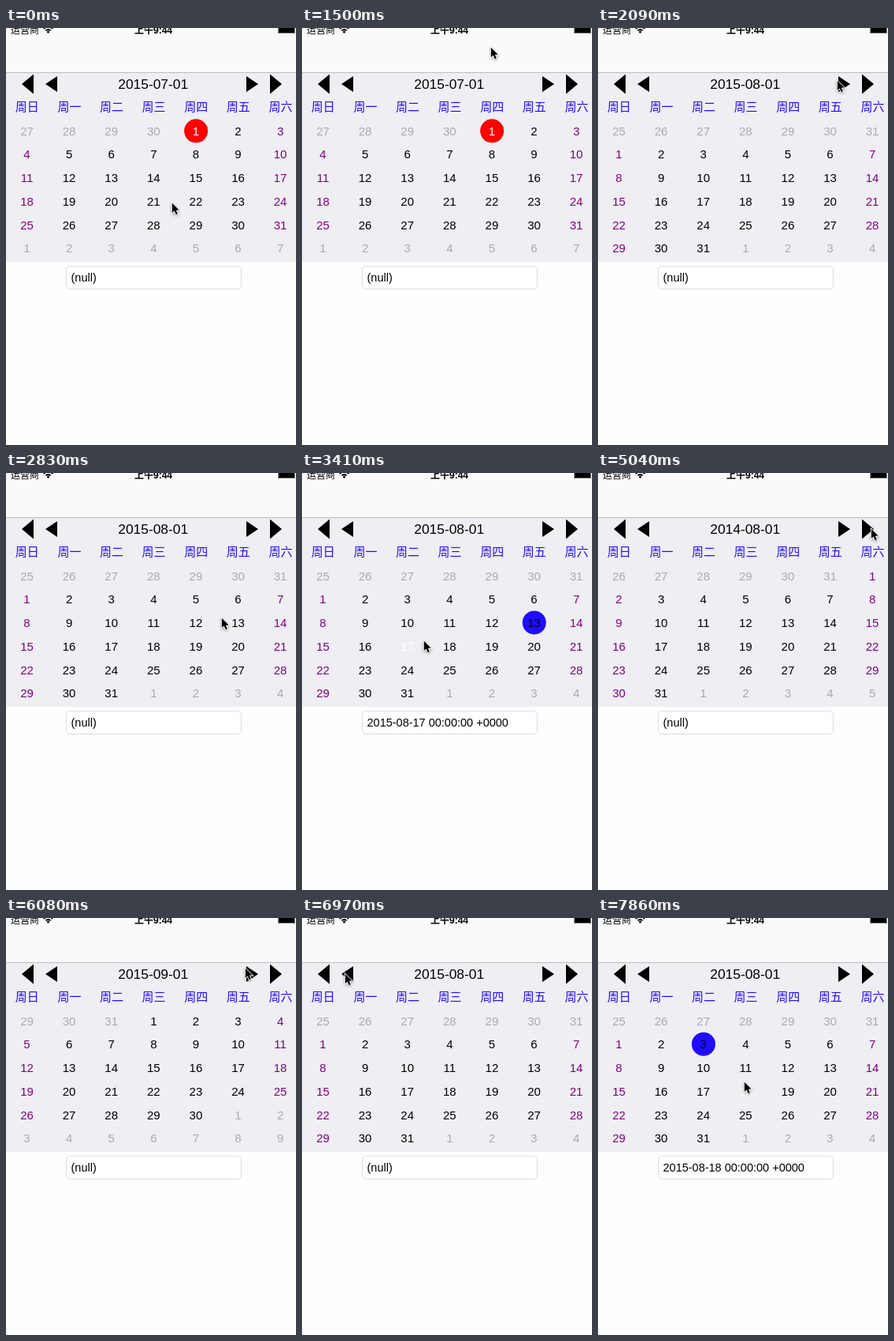
An HTML page with a canvas that plays this animation: 368 px wide and 528 px high, repeating every 8 s.

```html
<!DOCTYPE html>
<html lang="zh">
<head>
<meta charset="utf-8">
<title>Calendar</title>
<style>
  html, body { margin: 0; width: 100%; height: 100%; overflow: hidden; background: #fefefe; }
  canvas { display: block; width: 368px; height: 528px; }
</style>
</head>
<body>
<canvas id="stage"></canvas>
<script>
const W = 368, H = 528, LOOP = 8000, START = 892, TICK = 148;
const SANS = '"Liberation Sans", Arial, sans-serif';
const HAN = '"Noto Sans CJK SC", "Noto Sans CJK", sans-serif';
const BLUE = '#200dff';

const canvas = document.getElementById('stage');
const ctx = canvas.getContext('2d');
const ratio = window.devicePixelRatio || 1;
canvas.width = W * ratio;
canvas.height = H * ratio;

// The session is acted out once, one snapshot per tick.
const film = [];
const now = { x: 210, y: 221, year: 2015, month: 7, selected: 0, ringed: 0 };

function hold(ticks) {
  for (let i = 0; i < ticks; i++) {
    now.ringed = now.selected; // the ring follows one tick late
    film.push({ ...now });
  }
}

function go(x, y, ticks) {
  const dx = (x - now.x) / ticks, dy = (y - now.y) / ticks;
  for (let i = 0; i < ticks; i++) {
    now.x += dx;
    now.y += dy;
    hold(1);
  }
}

// Clicks take effect in the latest snapshot.
function click(change) {
  Object.assign(now, change);
  film[film.length - 1] = { ...now };
}

const pick = day => click({ selected: day });

function turn(months) {
  const date = new Date(Date.UTC(now.year, now.month - 1 + months, 1));
  click({ year: date.getUTCFullYear(), month: date.getUTCMonth() + 1, selected: 0, ringed: 0 });
}

hold(1);
go(239, 24, 5);
go(303, 66, 3);
hold(1);
turn(1);
go(313, 67, 1);
hold(1);
go(273, 183, 3);
go(286, 186, 1);
pick(13);
go(154, 212, 3);
pick(17);
go(27, 69, 4);
hold(2);
turn(-12);
go(346, 70, 5);
hold(3);
turn(12);
go(308, 66, 1);
hold(2);
turn(1);
go(303, 63, 1);
go(54, 70, 4);
hold(2);
turn(-1);
go(130, 158, 3);
pick(3);
go(185, 207, 3);
pick(18);

const pad = n => String(n).padStart(2, '0');
const daysIn = (year, month) => new Date(Date.UTC(year, month, 0)).getUTCDate();
const colX = col => 26.5 + 53.6 * col;
const rowY = row => 130.3 + 29.7 * row;

function text(str, x, y, font, color, align = 'center') {
  ctx.font = font;
  ctx.fillStyle = color;
  ctx.textAlign = align;
  ctx.fillText(str, x, y);
}

function rect(x, y, w, h, color) {
  ctx.fillStyle = color;
  ctx.fillRect(x, y, w, h);
}

function disc(x, y, r, color) {
  ctx.beginPath();
  ctx.arc(x, y, r, 0, Math.PI * 2);
  ctx.fillStyle = color;
  ctx.fill();
}

function arrow(tip, base, half) {
  ctx.beginPath();
  ctx.moveTo(tip, 71);
  ctx.lineTo(base, 71 - half);
  ctx.lineTo(base, 71 + half);
  ctx.fillStyle = '#000';
  ctx.fill();
}

function statusBar() {
  text('运营商', 6, 6.5, '12px ' + HAN, '#000', 'left');
  text('上午9:44', 187, 6.5, 'bold 12px "Liberation Sans", ' + HAN, '#000');
  ctx.strokeStyle = '#000';
  ctx.lineWidth = 1.8;
  for (const r of [4, 7.5]) {
    ctx.beginPath();
    ctx.arc(53.5, 6, r, -Math.PI * 0.77, -Math.PI * 0.23);
    ctx.stroke();
  }
  disc(53.5, 5, 1.5, '#000');
  rect(345, 0, 22, 7, '#888');
  rect(346, 0, 20, 6, '#000');
}

function header({ year, month }) {
  rect(0, 0, W, 56, '#fafafa');
  rect(0, 56, W, 1, '#bcbcc0');
  rect(0, 57, W, 239, '#efeef3');
  statusBar();
  arrow(20, 35, 12.5);
  arrow(50, 65, 10);
  arrow(320, 305, 10);
  arrow(350, 335, 12.5);
  text(`${year}-${pad(month)}-01`, 186.7, 77, '17.4px ' + SANS, '#000');
  [...'日一二三四五六'].forEach((d, i) =>
    text('周' + d, colX(i) + 0.3, 105, '15px ' + HAN, BLUE));
}

function days({ year, month, selected, ringed }) {
  const lead = new Date(Date.UTC(year, month - 1, 1)).getUTCDay() + 1;
  const count = daysIn(year, month), before = daysIn(year, month - 1);
  for (let i = 0; i < 42; i++) {
    const col = i % 7, x = colX(col), y = rowY(Math.floor(i / 7));
    const n = i - lead + 1;
    const inside = n > 0 && n <= count;
    const today = n === 1 && month === 7;
    let color = '#aaa9ad';
    if (inside) color = col % 6 ? '#000' : '#800080';
    if (today) disc(x + 0.2, y, 15, '#f00');
    if (inside && n === ringed) disc(x + 0.2, y - 0.3, 15, BLUE);
    if (today || (inside && n === selected)) color = '#fff';
    const label = n < 1 ? before + n : n > count ? n - count : n;
    text(label, x, y + 5.4, '15px ' + SANS, color);
  }
}

function field({ year, month, selected }) {
  ctx.beginPath();
  ctx.roundRect(76.5, 301.5, 222, 29, 5);
  ctx.fillStyle = '#fff';
  ctx.fill();
  ctx.strokeStyle = '#dedede';
  ctx.lineWidth = 1;
  ctx.stroke();
  const value = selected
    ? `${year}-${pad(month)}-${pad(selected)} 00:00:00 +0000`
    : '(null)';
  text(value, 82.5, 320.6, '14.5px ' + SANS, '#000', 'left');
}

function pointer({ x, y }) {
  ctx.save();
  ctx.translate(x + 0.8, y + 0.8);
  ctx.scale(0.88, 0.88);
  ctx.beginPath();
  ctx.moveTo(0, 0);
  ctx.lineTo(0, 14);
  ctx.lineTo(3.2, 11);
  ctx.lineTo(5.6, 16.3);
  ctx.lineTo(8, 15.2);
  ctx.lineTo(5.7, 10.2);
  ctx.lineTo(10, 10);
  ctx.closePath();
  ctx.shadowColor = 'rgba(0,0,0,0.4)';
  ctx.shadowBlur = 3 * ratio;
  ctx.shadowOffsetY = ratio;
  ctx.strokeStyle = '#fff';
  ctx.lineWidth = 2;
  ctx.stroke();
  ctx.shadowColor = 'transparent';
  ctx.fillStyle = '#000';
  ctx.fill();
  ctx.restore();
}

function draw(ms) {
  const tick = Math.floor((ms - START) / TICK) + 1;
  const shot = film[Math.min(film.length - 1, Math.max(0, tick))];
  ctx.setTransform(ratio, 0, 0, ratio, 0, 0);
  rect(0, 0, W, H, '#fefefe');
  header(shot);
  days(shot);
  field(shot);
  pointer(shot);
}

const begin = performance.now();
function loop() {
  draw((performance.now() - begin) % LOOP);
  requestAnimationFrame(loop);
}
loop();
</script>
</body>
</html>
```
